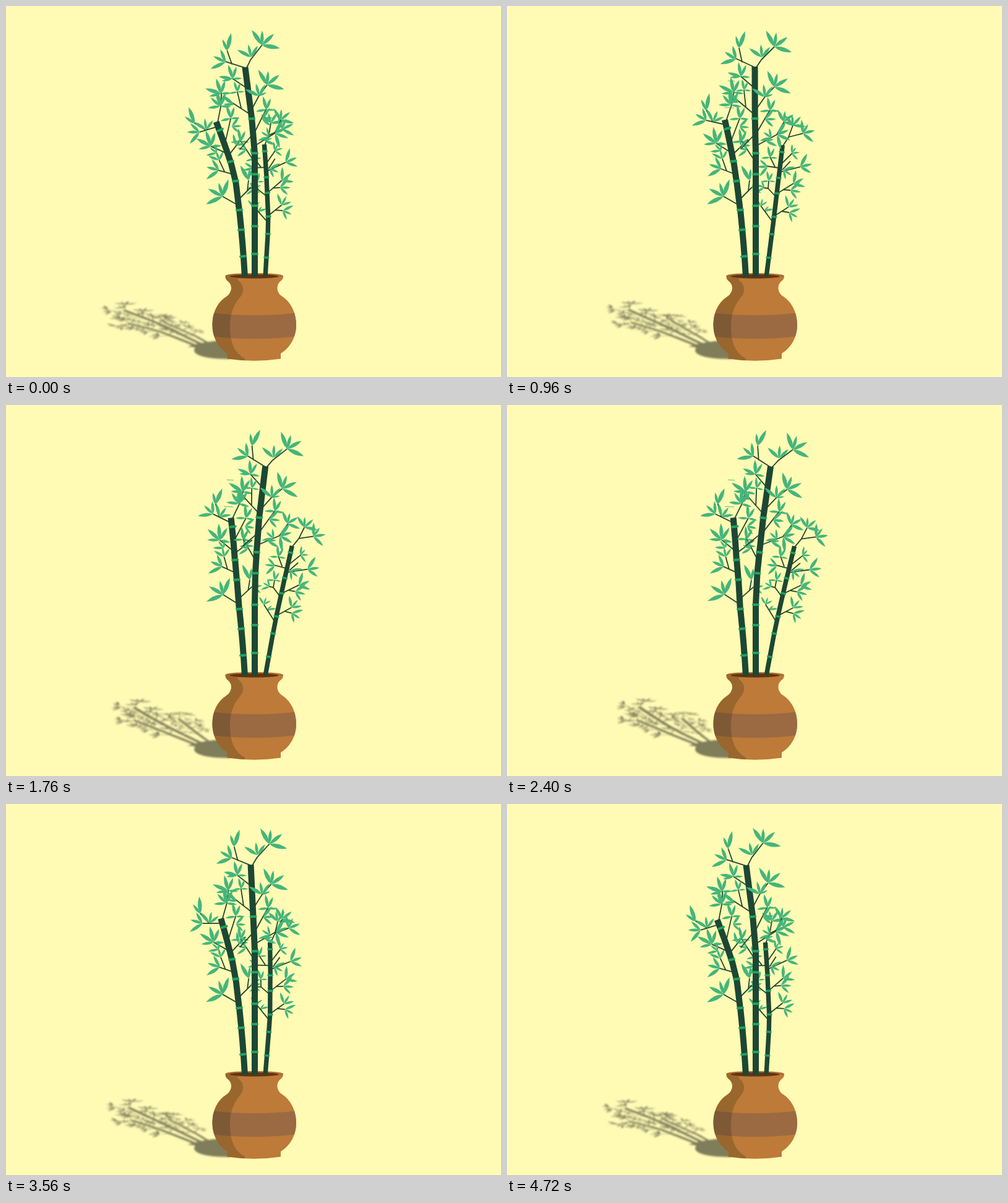
Recreate the animation shown at these times as an HTML page without scripts. Size 800 by 600 pixels, loop 4.76 s.

```html
<!DOCTYPE html>
<html lang="en">
<head>
<meta charset="utf-8">
<title>Bamboo in a pot</title>
<style>
  /* Weight of each pose; the upright pose has all weights at zero. */
  @property --wa { syntax: "<number>"; inherits: true; initial-value: 0; }
  @property --wc { syntax: "<number>"; inherits: true; initial-value: 0; }
  @property --wd { syntax: "<number>"; inherits: true; initial-value: 0; }
  @property --we { syntax: "<number>"; inherits: true; initial-value: 0; }
  @property --wf { syntax: "<number>"; inherits: true; initial-value: 0; }

  html, body { margin: 0; width: 100%; height: 100%; overflow: hidden; background: #fffab4; }
  svg { display: block; width: 100%; height: 100%; }
  .leaf { fill: #45b57b; }
  .stalk, .node, .twig { fill: none; }
  .stalk { stroke: #1c4734; stroke-width: 10; }
  .node { stroke: #1fa25c; stroke-width: 4; stroke-linecap: round; }
  .thin .stalk { stroke-width: 7.4; }
  .thin .node { stroke-width: 3.4; }
  .twig { stroke: #23472f; stroke-width: 1.8; stroke-linejoin: round; }

  .sway { animation: sway 4.76s infinite; }
  .shadow { animation-delay: -4.56s; filter: brightness(0) blur(1.4px) opacity(.5); }
  @keyframes sway {
    0% { --wa: 1; --wc: 0; --wd: 0; --we: 0; --wf: 0; animation-timing-function: cubic-bezier(.42, 0, .75, .68); }
    20.17% { --wa: 0; --wc: 0; --wd: 0; --we: 0; --wf: 0; animation-timing-function: linear; }
    36.97% { --wa: 0; --wc: 1; --wd: 0; --we: 0; --wf: 0; animation-timing-function: cubic-bezier(.3, .5, .6, 1); }
    50.42% { --wa: 0; --wc: 0; --wd: 1; --we: 0; --wf: 0; animation-timing-function: cubic-bezier(.42, .1, .75, .7); }
    65.55% { --wa: 0; --wc: 0; --wd: 0; --we: 1; --wf: 0; animation-timing-function: cubic-bezier(.25, .4, .6, .9); }
    85.71% { --wa: 0; --wc: 0; --wd: 0; --we: 0; --wf: 1; animation-timing-function: cubic-bezier(.2, .5, .6, 1); }
    100% { --wa: 1; --wc: 0; --wd: 0; --we: 0; --wf: 0; }
  }

  /* Each joint turns about its own origin; --a to --f are its degrees in each pose. */
  .j {
    transform: rotate(calc(1deg * (var(--a) * var(--wa) + var(--c) * var(--wc) + var(--d) * var(--wd)
      + var(--e) * var(--we) + var(--f) * var(--wf))));
  }
  .m1 { transform-origin: 402px 323px; --a: 0; --c: 1.1; --d: 2.8; --e: 0; --f: 0; }
  .m2 { transform-origin: 402px 272px; --a: 0; --c: 2.3; --d: 3.1; --e: .3; --f: 0; }
  .m3 { transform-origin: 402px 238px; --a: -3.6; --c: 2.2; --d: 1.7; --e: .7; --f: -2.6; }
  .m4 { transform-origin: 400.7px 182px; --a: -3.6; --c: 1.4; --d: .7; --e: 1.4; --f: -2.9; }

  .l1 { transform-origin: 377px 330px; --a: 0; --c: 2.5; --d: 3.7; --e: .7; --f: 0; }
  .l2 { transform-origin: 371px 283px; --a: -5.6; --c: 1.1; --d: -.1; --e: 1.1; --f: -4.1; }
  .l3 { transform-origin: 366px 251px; --a: -2.4; --c: 2.8; --d: 3.7; --e: .1; --f: -2.3; }
  .l4 { transform-origin: 353px 188px; --a: -22; --c: 7; --d: 6; --e: 4; --f: -18; }

  .r1 { transform-origin: 419px 438px; --a: -4; --c: 2.9; --d: 3.2; --e: -.8; --f: -3.9; }
  .r2 { transform-origin: 428px 369px; --a: -2; --c: 1; --d: 1.6; --e: .3; --f: -.7; }
  .r3 { transform-origin: 431.5px 341px; --a: -3.3; --c: 1.7; --d: 1.4; --e: -1.9; --f: -4.1; }
  .r4 { transform-origin: 439px 278px; --a: -1.2; --c: .4; --d: .7; --e: -.6; --f: -1.1; }

  .specks { fill: none; stroke: #45b57b; animation: specks 4.76s step-end infinite; }
  @keyframes specks { 0%, 68%, 100% { opacity: 0; } 17% { opacity: .9; } }
</style>
</head>
<body>
<svg viewBox="0 0 800 600">
  <defs>
    <path id="leaf" class="leaf" d="M0 0Q-6.600-13 0-28Q6.600-13 0 0"/>
    <g id="pair">
      <use href="#leaf" transform="rotate(20)scale(1.04)"/>
      <use href="#leaf" transform="rotate(-15)scale(.72)"/>
    </g>
    <g id="trio">
      <use href="#leaf" transform="rotate(-55)scale(.9)"/>
      <use href="#leaf" transform="rotate(-5)scale(.74)"/>
      <use href="#leaf" transform="rotate(38)scale(.76)"/>
    </g>
    <g id="fan">
      <use href="#leaf" transform="rotate(-27)scale(1.05)"/>
      <use href="#leaf" transform="rotate(8)scale(.83)"/>
      <use href="#leaf" transform="rotate(54)scale(.95)"/>
      <use href="#leaf" transform="rotate(107)scale(1.05)"/>
    </g>
    <g id="tuft">
      <use href="#leaf" transform="rotate(-95)scale(.6)"/>
      <use href="#leaf" transform="rotate(-10)scale(.8)"/>
      <use href="#leaf" transform="rotate(25)scale(.7)"/>
      <use href="#leaf" transform="rotate(95)scale(.52)"/>
    </g>
    <clipPath id="pot">
      <path d="M354.5 436.5C354.5 441 356 443 359 445.5C367 452 365 464 356 470C341 480 333.5 496 333.5 516C333.5 535 342 552 357.5 562V570.5Q401 577 444 570.5V562C460 552 469 535 469 516C469 496 461 480 447 470C437 464 436 452 443 445.5C446.5 443 448 441 448 436.5C448 430.5 354.5 430.5 354.5 436.5"/>
    </clipPath>
  </defs>

  <rect width="800" height="600" fill="#fffab4"/>
  <g class="sway shadow">
    <use href="#plant" transform="matrix(.57 -.11 .37 .18 -66 517)"/>
    <path d="M362 541C335 541 315 544 293 551Q304 551 306 553C299 560 310 571 362 571Z"/>
  </g>

  <g clip-path="url(#pot)">
    <path fill="#bd7a38" d="M330 430h142v147H330z"/>
    <path fill="#9b6a42" d="M330 496Q401 504.500 472 496V534Q401 542.500 330 534Z"/>
    <path fill="#0a1408" opacity=".2" d="M330 430H373L375 444C385 450 385 463 379 470C366 485 362 500 362 520C362 545 370 562 386 570V577H330Z"/>
    <ellipse cx="401.200" cy="436.500" rx="46.700" ry="4.800" fill="#a9682e" opacity=".6"/>
    <ellipse cx="401" cy="437.300" rx="39.500" ry="3.200" fill="#5f3513"/>
  </g>

  <g class="sway">
    <g id="plant">
      <g class="thin">
        <g class="j r1">
          <g class="j r2">
            <path class="twig" d="M429 349L410 323M418 334L417 330M433 339L444 332L456 334M444 332L455 325"/>
            <use href="#trio" transform="translate(410 323)rotate(20)scale(.58)"/>
            <use href="#pair" transform="translate(416 331)rotate(60)scale(.5)"/>
            <use href="#trio" transform="translate(455 325)rotate(40)scale(.78)"/>
            <use href="#trio" transform="translate(456 334)rotate(125)scale(.76)"/>
            <g class="j r3">
              <path class="twig" d="M434 308L422 295L423 283M422 295L415 294M437 303L463 287M446 297L458 298"/>
              <use href="#tuft" transform="translate(423 283)scale(.75)"/>
              <use href="#trio" transform="translate(416 294)rotate(-60)scale(.6)"/>
              <use href="#trio" transform="translate(463 288)rotate(65)scale(.9)"/>
              <use href="#trio" transform="translate(458 298)rotate(105)scale(.82)"/>
              <g class="j r4">
                <path class="twig" d="M440 262L420 259M433 260L425 244M443 256L461 238M443 268L474 260M445 265L458 251M446 226L455 212L478 206M455 212L462 193"/>
                <use href="#tuft" transform="translate(425 245)scale(.85)"/>
                <use href="#trio" transform="translate(421 260)rotate(-85)scale(.8)"/>
                <use href="#fan" transform="translate(460 238)rotate(30)scale(.5)"/>
                <use href="#trio" transform="translate(474 260)rotate(82)scale(.95)"/>
                <use href="#trio" transform="translate(447 265)rotate(130)scale(.75)"/>
                <use href="#fan" transform="translate(478 206)rotate(22)scale(.75)"/>
                <use href="#fan" transform="translate(462 193)rotate(-12)scale(.72)"/>
                <path class="stalk" d="M439 279L445.3 225"/>
                <path class="node" d="M441 235.7l6 .8"/>
              </g>
              <path class="stalk" d="M431.4 342L439.1 277"/>
              <path class="node" d="M433.3 302.6l6 .8M436 277.6l6 .8"/>
            </g>
            <path class="stalk" d="M427.9 370L431.7 340"/>
            <path class="node" d="M428.7 340.6l6 .8"/>
          </g>
          <path class="stalk" d="M419.2 437L428.1 368"/>
          <path class="node" d="M420 406.6l6 .8M425 368.6l6 .8"/>
        </g>
      </g>

      <g>
        <g class="j l1">
          <path class="twig" d="M373 321L350 308M378 311L396 293M390 299L392 282"/>
          <use href="#fan" transform="translate(350 308)scale(-1 1)rotate(8)"/>
          <use href="#pair" transform="translate(392 282)rotate(-9)scale(-.95 .95)"/>
          <use href="#trio" transform="translate(396 294)rotate(82)scale(.8)"/>
          <g class="j l2">
            <path class="twig" d="M366 271L345 263M355 267L348 247"/>
            <use href="#trio" transform="translate(348 247)rotate(-8)scale(.75)"/>
            <use href="#trio" transform="translate(346 263)rotate(-65)"/>
            <g class="j l3">
              <path class="twig" d="M362 237L338 222M363 216L376 182M367 238L390 216M354 186L363 160L367 138"/>
              <use href="#tuft" transform="translate(338 222)scale(1.2)"/>
              <use href="#leaf" transform="translate(338 222)rotate(-54)scale(.95)"/>
              <use href="#trio" transform="translate(346 234)rotate(-40)scale(.7)"/>
              <use href="#tuft" transform="translate(376 182)"/>
              <use href="#trio" transform="translate(376 195)rotate(100)scale(.75)"/>
              <use href="#trio" transform="translate(378 226)rotate(50)scale(.75)"/>
              <use href="#tuft" transform="translate(366 140)scale(1.15)"/>
              <use href="#leaf" transform="translate(366 140)rotate(-64)scale(.95)"/>
              <use href="#tuft" transform="translate(362 160)rotate(5)scale(1.2)"/>
              <use href="#leaf" transform="translate(362 160)rotate(-40)scale(.75)"/>
              <g class="j l4">
                <path class="twig" d="M353 192L322 185M333 188L322 168"/>
                <use href="#pair" transform="translate(322 169)rotate(-10)scale(.97)"/>
                <use href="#trio" transform="translate(322 185)rotate(-55)scale(.98)"/>
                <use href="#trio" transform="translate(333 187)rotate(28)scale(.9)"/>
              </g>
              <path class="stalk" d="M366 252Q361 224 352 184"/>
              <path class="node" d="M352.5 199l8-2"/>
            </g>
            <path class="stalk" d="M371 284L366 250"/>
            <path class="node" d="M362 251.6l8-1.2"/>
          </g>
          <path class="stalk" d="M377 331L371 282"/>
          <path class="node" d="M367 283.4l8-1"/>
        </g>
        <path class="stalk" d="M386 438Q383 385 377 329"/>
        <path class="node" d="M379 405.2l8-.7M376 362.3l8-.7M373 330.3l8-.7"/>
      </g>

      <g>
        <g class="j m1">
          <g class="j m2">
            <path class="twig" d="M400 250L379 218"/>
            <use href="#tuft" transform="translate(379 219)scale(.95)"/>
            <use href="#trio" transform="translate(388 233)rotate(-70)scale(.7)"/>
            <g class="j m3">
              <path class="twig" d="M403 206L425 168M403 226L436 208L448 187M399 209L378 231"/>
              <use href="#tuft" transform="translate(425 169)"/>
              <use href="#trio" transform="translate(417 183)rotate(95)scale(.86)"/>
              <use href="#fan" transform="translate(447 187)scale(.75)"/>
              <use href="#fan" transform="translate(437 208)rotate(60)scale(.85)"/>
              <use href="#trio" transform="translate(427 213)rotate(-50)scale(.75)"/>
              <use href="#pair" transform="translate(418 218)rotate(95)scale(.7)"/>
              <g class="j m4">
                <path class="twig" d="M400 99L370 85M380 91L375 68M403 99L411 87L432 66M399 132L378 114M398 174L372 152M386 164L383 136M402 168L416 148L432 131"/>
                <use href="#pair" transform="translate(375 68)"/>
                <use href="#trio" transform="translate(370 86)rotate(-52)scale(1.05)"/>
                <use href="#leaf" transform="translate(370 86)rotate(-12)scale(.7)"/>
                <use href="#fan" transform="translate(432 66)"/>
                <use href="#trio" transform="translate(412 83)"/>
                <use href="#tuft" transform="translate(378 114)scale(1.05)"/>
                <use href="#leaf" transform="translate(378 114)rotate(-74)scale(.8)"/>
                <use href="#tuft" transform="translate(383 136)scale(.8)"/>
                <use href="#pair" transform="translate(375 156)rotate(-65)scale(.85)"/>
                <use href="#fan" transform="translate(432 131)rotate(4)scale(.97)"/>
                <path class="stalk" d="M400.7 183L400.5 98"/>
                <use href="#trio" transform="translate(417 147)rotate(-2)"/>
                <use href="#leaf" transform="translate(417 147)rotate(72)scale(.48)"/>
              </g>
              <path class="stalk" d="M402 239L400.7 181"/>
              <path class="node" d="M396.7 182h8"/>
            </g>
            <path class="stalk" d="M402 273V237"/>
            <path class="node" d="M398 238h8"/>
          </g>
          <path class="stalk" d="M402 324V271"/>
          <path class="node" d="M398 272h8"/>
        </g>
        <path class="stalk" d="M402 438V322"/>
        <path class="node" d="M398 401h8M398 356h8M398 323h8"/>
      </g>
    </g>
  </g>
  <path class="specks" d="M357 121l11 .6M352 164l15 1"/>
</svg>
</body>
</html>
```
